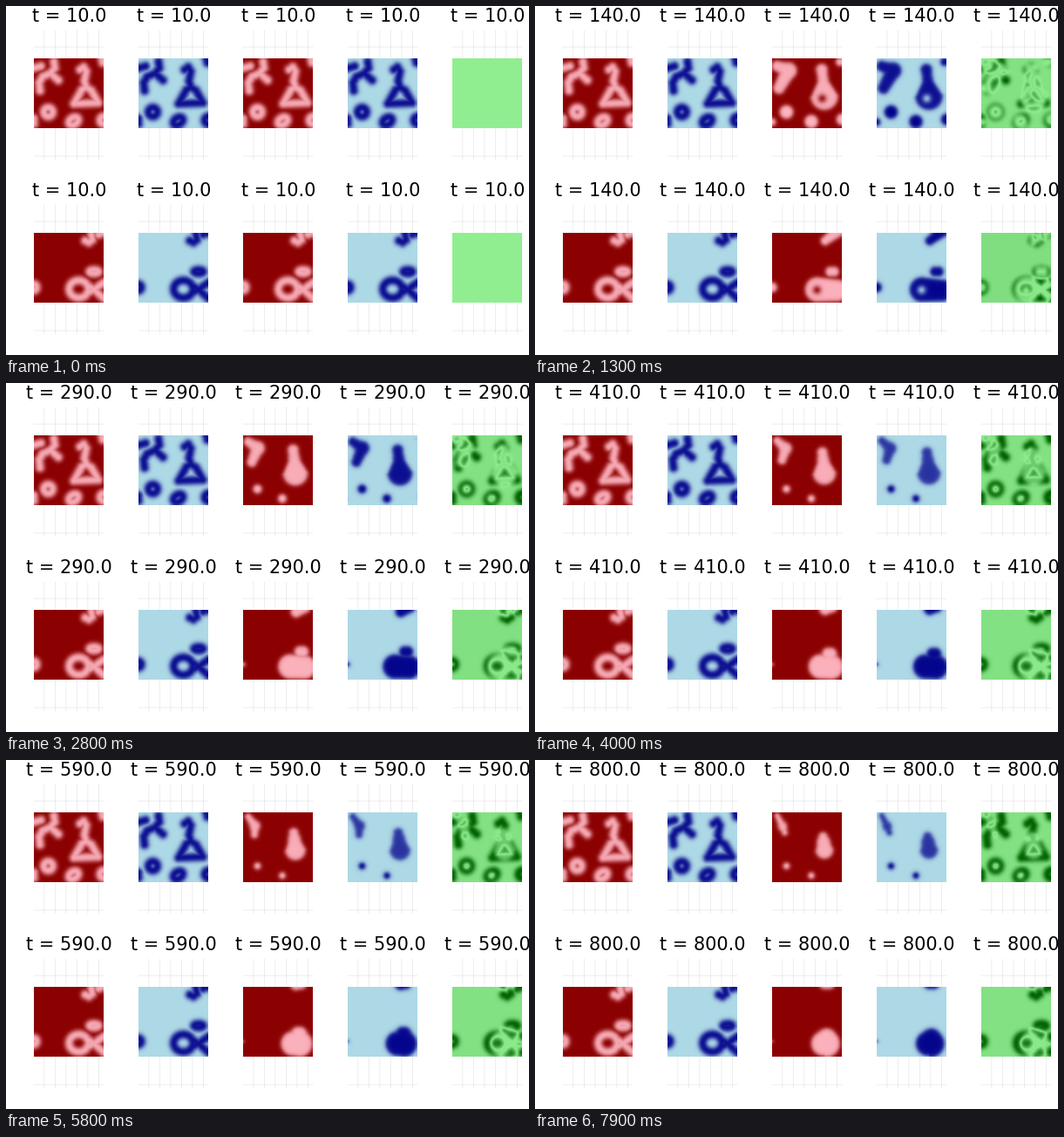
Animation, 600 px wide and 400 px high, one loop 8 s. Source, as a matplotlib script:

```python
import matplotlib.pyplot as plt
import numpy as np
from matplotlib.animation import FuncAnimation
from matplotlib.colors import LinearSegmentedColormap

N, SIDE, FRAMES = 64, 80, 80
LEFT, TOP, DX, DY = 32, 60.2, 120, 200
T0, T_MERGE, T_END = 10, 140, 800
X, Y = np.meshgrid(*[(np.arange(N) + 0.5) * SIDE / N] * 2)


def cmap(lo, hi):
    return LinearSegmentedColormap.from_list(lo + hi, [lo, hi])


RED = cmap("darkred", "lightpink")
BLUE = cmap("lightblue", "darkblue")
GREEN = cmap("lightgreen", "darkgreen")


def capsule(a, b):
    """Signed distance to a tapered capsule; nodes are (x, y, radius)."""
    ux, uy = b[0] - a[0], b[1] - a[1]
    h = ((X - a[0]) * ux + (Y - a[1]) * uy) / (ux * ux + uy * uy + 1e-9)
    h = np.clip(h, 0, 1)
    d = np.hypot(X - a[0] - h * ux, Y - a[1] - h * uy)
    return d - a[2] - h * (b[2] - a[2])


def smooth_min(a, b, k=3.0):
    h = np.clip(0.5 + (b - a) / (2 * k), 0, 1)
    return b + (a - b) * h - k * h * (1 - h)


def soft(d):
    return 1 / (1 + np.exp(np.clip(d / 1.3, -40, 40)))


def ring(cx, cy, rx, ry, tilt=0):
    t = np.linspace(0, 2 * np.pi, 25)
    c, s = np.cos(tilt), np.sin(tilt)
    x, y = rx * np.cos(t), ry * np.sin(t)
    return list(zip(cx + c * x - s * y, cy + s * x + c * y))


def ridges(lines):
    """Soft ridge of constant width along each line."""
    d = np.full((N, N), 99.0)
    for line in lines:
        for (ax, ay), (bx, by) in zip(line[:-1], line[1:]):
            d = np.minimum(d, capsule((ax, ay, 0), (bx, by, 0)))
    return 0.92 * np.exp(-0.69 * (np.maximum(d, 0) / 4.7) ** 2.4)


class Body:
    """Chain of nodes relaxing from a first to a last pose; one node is a dot."""

    def __init__(self, first, last, tau):
        self.first, self.last = np.array(first, float), np.array(last, float)
        self.tau, self.dot = tau, len(first) == 1

    def distance(self, t):
        s = max(t - T_MERGE, 0)
        p = np.expm1(-s / self.tau) / np.expm1(-(T_END - T_MERGE) / self.tau)
        nodes = self.first + p * (self.last - self.first)
        d = capsule(nodes[0], nodes[-1]) if len(nodes) < 3 else None
        if d is None:
            d = smooth_min(capsule(*nodes[:2]), capsule(*nodes[1:]))
        return d


def dot(x, y, r0, r1):
    return Body([(x, y, r0)], [(x, y, r1)], 130)


START = [
    ridges([
        [(23, 4), (24, 11), (19, 17), (10, 21), (6, 28), (7, 37)],
        [(19, 17), (28, 25)],
        [(1, 11), (8, 9)],
        [(53, 13), (57, 10), (60, 15), (58, 26), (60, 33)],
        [(60, 33), (55, 36), (46, 52), (74, 51), (66, 37), (60, 33)],
        ring(16.5, 61.5, 5, 5),
        ring(45.5, 72, 5.8, 4, -0.6),
        ring(80.5, 71, 4.5, 4.5),
        [(0, 69), (0, 75)],
        [(78, 1), (79, 5)],
    ]),
    ridges([
        [(59, 9), (63, 11), (67, 8), (66, 2)],
        [(74, 2), (80, 0)],
        ring(69, 44.5, 5, 2),
        ring(51.5, 64.5, 11, 10),
        [(61, 60), (69, 65), (80, 57)],
        [(61, 69), (69, 65), (80, 75)],
        ring(0, 62.5, 3, 3.5),
    ]),
]

BODIES = [
    [
        Body([(57, 13, 6.5), (58.5, 25, 5.5), (60, 43.5, 15.5)],
             [(58.5, 28, 5), (59, 34, 7), (60, 43, 10)], 2000),
        Body([(6, 9, 6), (19, 14, 8.5), (8, 34, 6.5)],
             [(6, 4, 2.8), (12, 16, 4.3), (14.5, 23, 3.2)], 700),
        dot(16.5, 61.5, 7.6, 3.4),
        dot(45, 72.5, 7.5, 3.3),
        dot(78, 4, 4.5, -6),
        dot(80.5, 70, 6.5, -6),
        dot(0, 73, 4, -6),
    ],
    [
        Body([(61, 9, 5), (75, -2, 7)], [(61, -5, 7.5), (65, -5, 7.5)], 250),
        Body([(67, 44.5, 5.5), (71, 44.5, 5.5)],
             [(62, 57, 9), (63, 57, 9)], 900),
        Body([(52, 65, 14), (74, 66, 12.5)],
             [(59, 65, 14), (62, 65, 15.6)], 600),
        dot(0, 62.5, 5.5, 0),
    ],
]
HOLES = [(57.5, 46), (51.5, 65.5)]


def evolved(row, t, level):
    d = np.full((N, N), 99.0)
    dots = np.zeros((N, N))
    for body in BODIES[row]:
        if body.dot:
            dots = np.maximum(dots, soft(body.distance(t)))
        else:
            d = smooth_min(d, body.distance(t))
    hx, hy = HOLES[row]
    depth = np.interp(t, [T_MERGE, 220], [0.85, 0])
    hole = depth * np.exp(-((X - hx) ** 2 + (Y - hy) ** 2) / 24)
    v = np.maximum(level * soft(d) * (1 - hole), dots)
    w = min((t - T0) / (T_MERGE - T0), 1)
    return (1 - w) * START[row] + w * v


def fields(row, t):
    a = START[row]
    level = np.interp(t, [290, 400], [0.93, 0.76]) if row == 0 else 0.97
    blue = evolved(row, t, level)
    red = evolved(row, t, max(level, 0.95))
    gap = a - blue
    peak = np.abs(gap).max()
    if peak > 0:
        gap = np.abs(gap / peak + 0.1)
        gap /= gap.max()
    return a, a, red, blue, gap


fig = plt.figure(figsize=(6, 4), dpi=100, facecolor="white")
ax = fig.add_axes([0, 0, 1, 1])
ax.axis("off")
images, titles = [], []
for row in range(2):
    for col, cm in enumerate([RED, BLUE, RED, BLUE, GREEN]):
        x0, y0 = LEFT + col * DX, TOP + row * DY
        grid = dict(color="black", alpha=0.1, lw=0.5, zorder=0, snap=False)
        for tick in range(10, 61, 10):
            x = x0 + (tick - 0.5) * SIDE / N
            ax.plot([x, x], [y0 - 32, y0 + 115.5], **grid)
        for tick in (-25, 75):
            y = y0 + SIDE - (tick - 0.5) * SIDE / N
            ax.plot([x0, x0 + SIDE], [y, y], **grid)
        images.append(ax.imshow(
            np.zeros((N, N)), cmap=cm, vmin=0, vmax=1, aspect="auto",
            extent=(x0, x0 + SIDE, y0 + SIDE, y0),
            interpolation="bilinear", zorder=2))
        titles.append(ax.text(72.4 + col * DX, 18 + row * DY, "", ha="center",
                              va="baseline", fontsize=15, family="DejaVu Sans"))
ax.set_xlim(0, 600)
ax.set_ylim(400, 0)


def draw(i):
    t = 10.0 * (i + 1)
    for im, data in zip(images, fields(0, t) + fields(1, t)):
        im.set_data(data)
    for title in titles:
        title.set_text(f"t = {t:.1f}")
    return images + titles


anim = FuncAnimation(fig, draw, frames=FRAMES, interval=100, repeat=True,
                     repeat_delay=0, blit=False)
plt.show()
```
